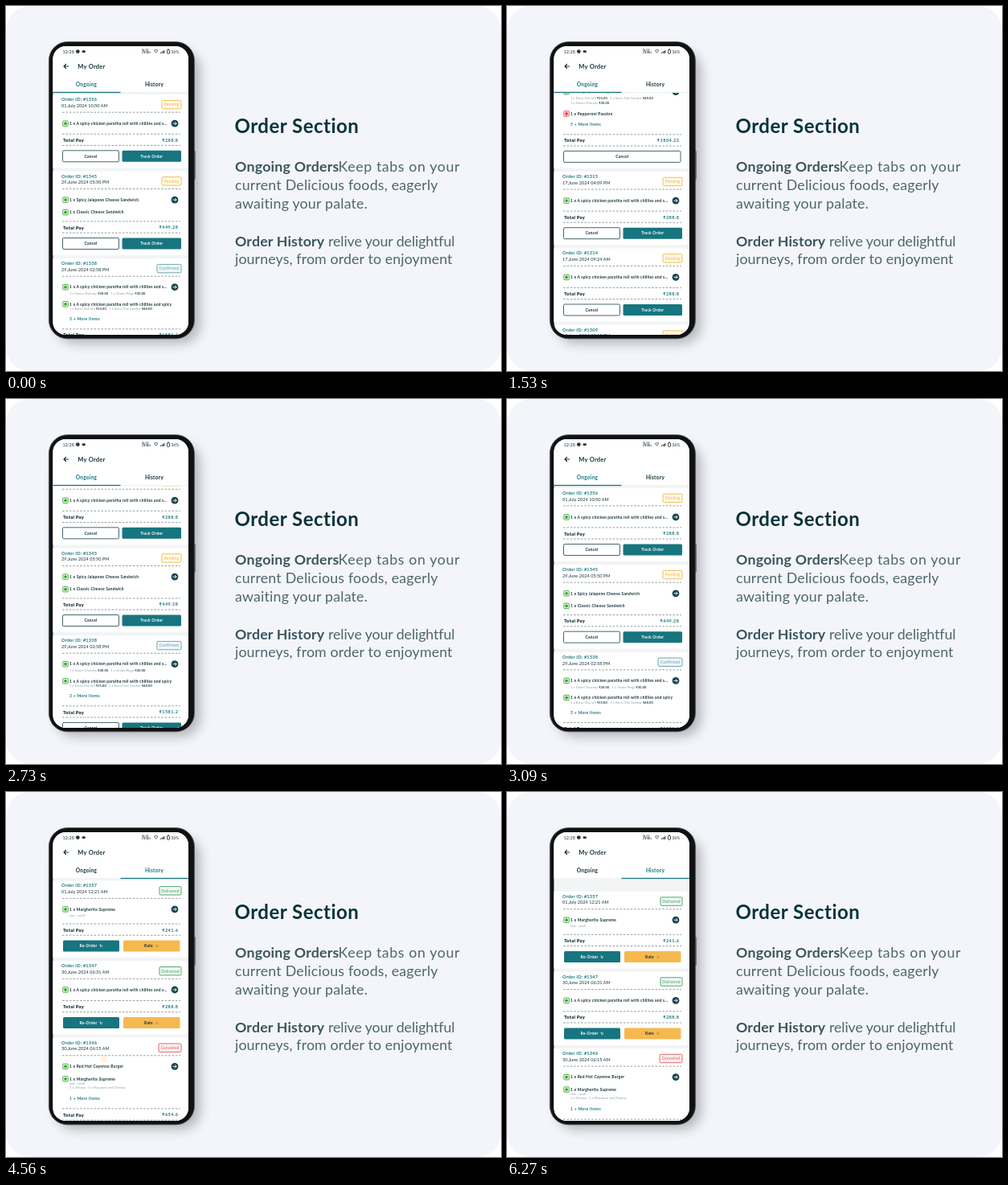
Recreate the animation shown at these times as an HTML page. Size 616 by 454 pixels, loop 6.3 s.

```html
<!DOCTYPE html>
<html lang="en">
<head>
<meta charset="utf-8">
<title>Order Section</title>
<style>
  html, body { margin: 0; width: 100%; height: 100%; overflow: hidden; background: #fff; }
  svg { display: block; width: 616px; height: 454px; }
  text { font-family: Lato, "Noto Sans", "DejaVu Sans", sans-serif; white-space: pre; }
</style>
</head>
<body>
<svg id="stage" viewBox="0 0 616 454"></svg>
<script>
const LOOP = 6300, TICK = 30;
const INK = '#16323a', TEAL = '#17757f', AMBER = '#f5b94f', GREY = '#8a9499';
const BADGES = {
  Pending: ['#f3b63f', '#fffaee', 24],
  Confirmed: ['#5f9fab', '#eff7f9', 30],
  Delivered: ['#3f9f62', '#f0f9f2', 27],
  Cancelled: ['#e2595c', '#fdf0f0', 28]
};

// y is the middle of the capitals
const text = (x, y, size, str, fill = INK, weight = 400, anchor = 'start', gap = 0) =>
  `<text x="${x}" y="${y + size * .36}" font-size="${size}" fill="${fill}" font-weight="${weight}" text-anchor="${anchor}" letter-spacing="${gap}">${str}</text>`;
const box = (x, y, w, h, r, fill, stroke = 'none') =>
  `<rect x="${x}" y="${y}" width="${w}" height="${h}" rx="${r}" fill="${fill}" stroke="${stroke}" stroke-width=".9"/>`;
const dot = (x, y, r, fill) => `<circle cx="${x}" cy="${y}" r="${r}" fill="${fill}"/>`;
const path = (d, stroke, width) =>
  `<path d="${d}" fill="none" stroke="${stroke}" stroke-width="${width}" stroke-linecap="round" stroke-linejoin="round"/>`;
const dashes = y => `<path d="M70 ${y}H217" stroke="#8b9396" stroke-width=".9" stroke-dasharray="2.6 1.8"/>`;

function button(x, y, w, label, fill, ink) {
  return box(x, y, w, 14, 1.5, fill, fill === '#fff' ? '#31565e' : 'none')
    + text(x + w / 2, y + 7, 4.9, label, ink, 700, 'middle', .22);
}

const BUTTONS = {
  track: y => button(70.5, y, 70, 'Cancel', '#fff', INK) + button(144.5, y, 73.5, 'Track Order', TEAL, '#fff'),
  cancel: y => button(70.5, y, 145.5, 'Cancel', '#fff', INK),
  again: y => button(71, y, 70, 'Re-Order  ↻', TEAL, '#fff') + button(146, y, 70.5, 'Rate  ☆', AMBER, INK)
};

function row(y, kind, str, first) {
  if (kind === 'sub')
    return text(79, y, 3.8, str.replace(/₹[\d.]+/g, `<tspan fill="${INK}" font-weight="700">$&</tspan>`), GREY, 400, 'start', .17);
  if (kind === 'more') return text(79, y, 4.9, str, TEAL, 700, 'start', .35);
  const mark = kind === 'veg' ? '#35a52c' : '#e0393e';
  return box(70.8, y - 3.2, 6.4, 6.4, .6, '#fff', mark) + dot(74, y, 1.9, mark)
    + text(79, y, 4.9, str, INK, 700, 'start', .22)
    + (first ? dot(210, y, 4.4, '#17444e') + path(`M208 ${y}h4m-1.6 -1.7l1.7 1.7l-1.7 1.7`, '#fff', .9) : '');
}

function card(y, c) {
  const [ink, fill, w] = BADGES[c.status], end = y + c.total;
  return box(57, y - 6, 171, c.total + 40.5, 0, '#fff')
    + text(69, y, 5.6, 'Order ID: #' + c.id, TEAL, 700, 'start', .22)
    + text(69, y + 7.7, 5.5, c.date, INK, 400, 'start', .05)
    + box(218 - w, y + 1.2, w, 10.4, 1.2, fill, ink)
    + text(218 - w / 2, y + 6.4, 5, c.status, ink, 400, 'middle', .15)
    + dashes(y + 16)
    + c.rows.map(([dy, kind, str], i) => row(y + dy, kind, str, !i)).join('')
    + dashes(end - 7.6)
    + text(71, end, 5.8, 'Total Pay', INK, 900, 'start', .25)
    + text(214.5, end, 5.5, '₹' + c.price, TEAL, 700, 'end', .5)
    + dashes(end + 6.6)
    + BUTTONS[c.action](end + 13);
}

function list(y, cards) {
  return cards.map(c => {
    const out = card(y, c);
    y += c.total + 44.7;
    return out;
  }).join('');
}

const order = (id, date, status, price, action, total, ...rows) => ({ id, date, status, price, action, total, rows });
const ROLL = '1 x A spicy chicken paratha roll with chillies and s...';
const EXTRAS = '1 x Extra One Idli ₹15.00,  1 x Extra One Sambar ₹40.00,';
const CHUTNEY = '1 x Green Chutney ₹20.00,';
const PIZZA = '1 x Margherita Supreme';
const roll = (id, date) => order(id, date, 'Pending', '288.8', 'track', 50.6, [30, 'veg', ROLL]);

const ongoing = [
  roll(1356, '01,July 2024 10:50 AM'),
  order(1345, '29,June 2024 05:50 PM', 'Pending', '449.28', 'track', 64,
    [29.6, 'veg', '1 x Spicy Jalapeno Cheese Sandwich'], [45.2, 'veg', '1 x Classic Cheese Sandwich']),
  order(1338, '29,June 2024 02:58 PM', 'Confirmed', '1581.2', 'track', 89.2,
    [29.5, 'veg', ROLL], [37.5, 'sub', CHUTNEY + '  1 x Onion Rings ₹20.00,'],
    [50.6, 'veg', '1 x A spicy chicken paratha roll with chillies and spicy'],
    [56.8, 'sub', EXTRAS], [69.5, 'more', '3 + More Items']),
  order(1320, '19,June 2024 02:48 PM', 'Confirmed', '1804.22', 'cancel', 90.4,
    [29.7, 'veg', ROLL], [37.3, 'sub', EXTRAS], [43.6, 'sub', CHUTNEY],
    [57, 'meat', '1 x Pepperoni Passion'], [70.7, 'more', '5 + More Items']),
  roll(1315, '17,June 2024 04:09 PM'),
  roll(1314, '17,June 2024 09:24 AM'),
  roll(1309, '15,June 2024 02:55 PM')
];
const history = [
  order(1357, '01,July 2024 12:21 AM', 'Delivered', '241.6', 'again', 55.2,
    [29.5, 'veg', PIZZA], [36.8, 'sub', 'size : small']),
  order(1347, '30,June 2024 06:31 AM', 'Delivered', '288.8', 'again', 50.8, [29.7, 'veg', ROLL]),
  order(1346, '30,June 2024 06:15 AM', 'Cancelled', '654.6', 'again', 89.7,
    [29.6, 'veg', '1 x Red Hot Cayenne Burger'], [45, 'veg', PIZZA], [50.8, 'sub', 'size : small'],
    [56, 'sub', '1 x Cheese,  1 x Macaroni and Cheese,'], [69.4, 'more', '1 + More Items']),
  order(1344, '29,June 2024 05:40 PM', 'Delivered', '288.8', 'again', 50.8, [29.7, 'veg', ROLL])
];

const statusBar = text(70.5, 56.8, 5.4, '12:28', INK, 400, 'start', .1)
  + dot(89.3, 56.6, 2.4, '#333') + box(94.6, 55.2, 4.2, 2.8, .8, '#333')
  + text(169, 55.3, 2.7, 'Vo  5.0', INK, 700) + text(169, 58.3, 2.7, 'LTE KB/s', INK, 700)
  + path('M184.8 55q2 -1.4 4 0l-2 3z', '#333', .7)
  + [0, 1, 2, 3].map(i => box(192 + i * 1.5, 57.6 - i * .9, 1, 1.2 + i * .9, 0, '#333')).join('')
  + box(200.5, 54.6, 3, 4.6, .6, 'none', '#333') + box(201.2, 53.4, 1.6, 1, 0, '#333')
  + text(215.5, 56.8, 5.2, '36%', INK, 400, 'end');

const body = (x, y, str, gap, weight = 400) =>
  text(x, y, 17.8, str, weight > 400 ? '#3b565e' : '#4c666e', weight, 'start', gap);
const copy = text(284.5, 149, 24, 'Order Section', '#07333b', 700, 'start', .5)
  + body(285, 200, 'Ongoing Orders', .22, 700) + body(413.5, 200, 'Keep tabs on your', .6)
  + body(285, 223, 'current Delicious foods, eagerly', .2)
  + body(285, 246, 'awaiting your palate.', .2)
  + body(285, 292.2, 'Order History', .15, 700) + body(401, 292.2, 'relive your delightful', -.1)
  + body(285, 315, 'journeys, from order to enjoyment', .12);

const $ = id => document.getElementById(id);
$('stage').innerHTML = `
  <defs>
    <clipPath id="screen"><rect x="58.4" y="50" width="168.6" height="359" rx="16"/></clipPath>
    <clipPath id="body"><rect x="57" y="108" width="171" height="302"/></clipPath>
    <filter id="blur" x="-30%" y="-30%" width="160%" height="160%"><feGaussianBlur stdDeviation="7"/></filter>
  </defs>
  ${box(0, 0, 616, 454, 30, '#f4f5fa')}
  <g filter="url(#blur)" opacity=".32">${box(62, 56, 180, 364, 24, '#30343c')}</g>
  ${box(232.5, 180, 3, 36, 1, '#2b2d30')}
  ${box(53.4, 44.6, 181, 369.2, 23, '#0f1113', '#55585c')}
  <g clip-path="url(#screen)">
    ${box(57, 49, 171, 361, 0, '#f3f4f6')}
    <g clip-path="url(#body)"><g id="pages">
      <g id="ongoing">${list(116.2, ongoing)}</g>
      <g transform="translate(170)"><g id="history">${list(116.4, history)}</g></g>
    </g></g>
    ${box(57, 49, 171, 59, 0, '#fff')}
    ${statusBar}
    ${path('M77.5 75h-5.4m2.4 -2.5l-2.5 2.5l2.5 2.5', INK, 1.2)}
    ${text(89.3, 75.2, 7.5, 'My Order', INK, 700, 'start', .25)}
    <g id="tabs">${text(100, 97.5, 6.5, 'Ongoing', INK, 700, 'middle', .25)}${text(184.5, 97.5, 6.5, 'History', INK, 700, 'middle', .25)}</g>
    ${box(57, 107.4, 171, .6, 0, '#e3e8ea')}
    <rect id="line" x="57.5" y="106.8" width="85" height="1.3" fill="${TEAL}"/>
    <circle id="touch" r="4" fill="#fff1da" stroke="#ffe3b8" stroke-width=".8"/>
  </g>
  ${copy}`;

const ease = p => 1 - (1 - Math.min(1, Math.max(0, p))) ** 3;
// each move: start, end, scroll offset reached
const follow = (t, moves) => moves.reduce((v, [a, b, to]) => v + (to - v) * ease((t - a) / (b - a)), 0);
const DRAGS = [[330, 900, 250], [1020, 1650, 378], [1680, 2280, 395.5], [2340, 2970, -2], [3000, 3300, 0]];
const HISTORY_DRAGS = [[4600, 5010, 100], [5730, 6270, -13.3]];

function draw() {
  const t = Math.floor(performance.now() % LOOP / TICK) * TICK;
  const slide = ease((t - 3600) / 450);
  const shift = (id, x, y) => $(id).setAttribute('transform', `translate(${x} ${y})`);
  shift('ongoing', 0, -follow(t, DRAGS));
  shift('history', 0, -follow(t, HISTORY_DRAGS));
  shift('pages', -170 * slide, 0);
  shift('line', 85 * slide, 0);
  [...$('tabs').children].forEach((tab, i) => tab.setAttribute('fill', (slide > .5) == i ? TEAL : INK));
  const late = t > 3600;
  shift('touch', late ? 122 : 131, late ? 332 : 331);
  $('touch').setAttribute('opacity', Math.max(0, .7 - Math.abs(t - (late ? 4560 : 2280)) / 130));
  requestAnimationFrame(draw);
}
draw();
</script>
</body>
</html>
```
